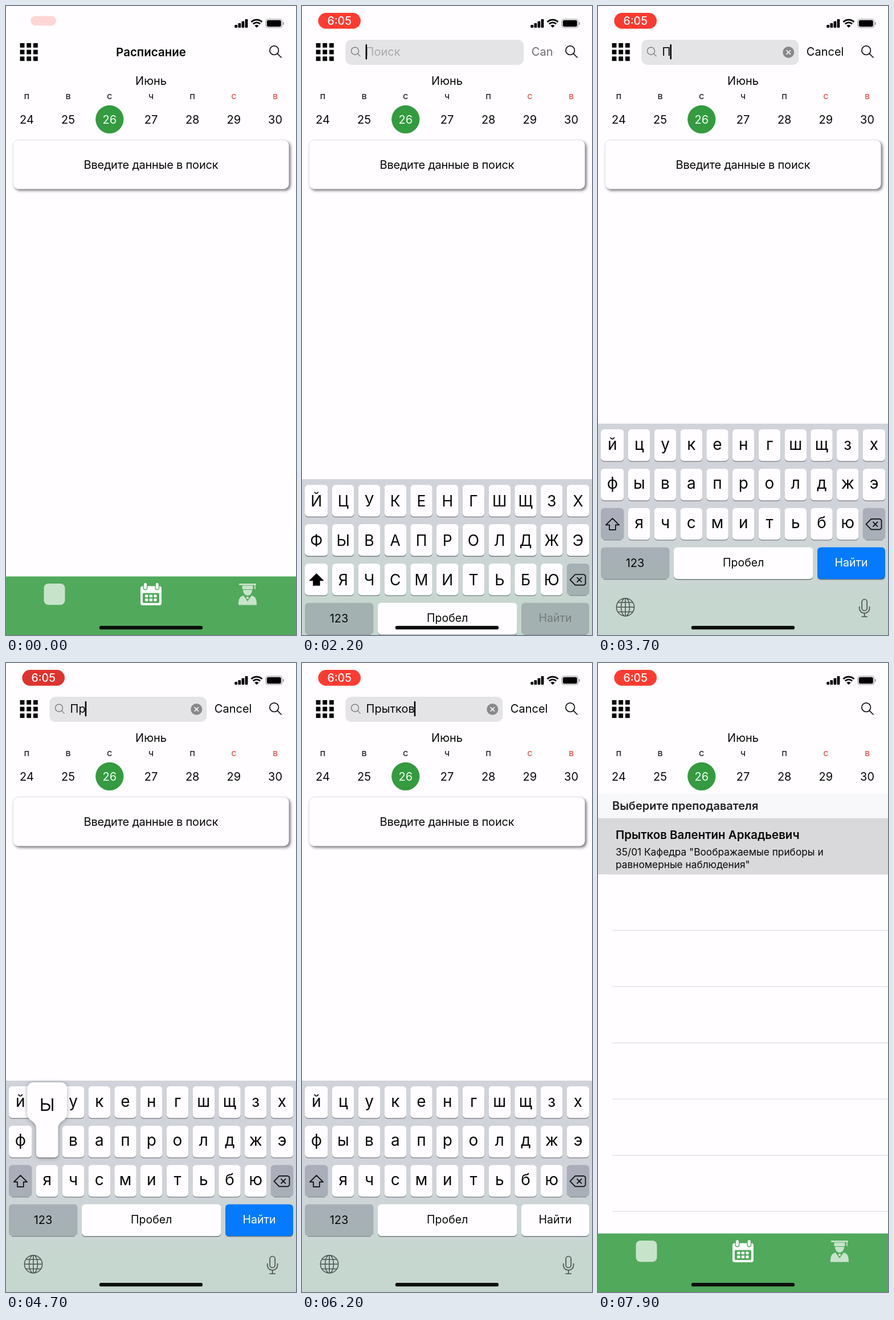
Animation, 509 px wide and 1101 px high, one loop 8000 ms. Source, as an HTML page with a canvas:

```html
<!DOCTYPE html>
<html lang="ru">
<head>
<meta charset="utf-8">
<style>
html, body { margin: 0; width: 100%; height: 100%; overflow: hidden; background: #fffdff; }
canvas { display: block; width: 509px; height: 1101px; }
</style>
</head>
<body>
<canvas id="stage"></canvas>
<script>
const W = 509, H = 1101, LOOP = 8000;
const canvas = document.getElementById('stage');
const c = canvas.getContext('2d');
const dpr = window.devicePixelRatio || 1;
canvas.width = W * dpr;
canvas.height = H * dpr;

const BG = '#fffdff', GREEN = '#51a95c', PALE = '#c7e4ca', BAR = '#e4e3e6';
const ROWS = ['йцукенгшщзх', 'фывапролджэ', ' ячсмитьбю '];
const KB_TOP = 731, KB_H = 370;

// letter, press time, release time
const TYPING = [
  ['П', 3450, 3560], ['р', 4180, 4290], ['ы', 4640, 4740], ['т', 4930, 5030],
  ['к', 5200, 5300], ['о', 5480, 5580], ['в', 5690, 5790]
];
const FIND_DOWN = 6080, DISMISS = 6330, RESULTS = 6780, SELECT = 7500;

const clamp = v => Math.max(0, Math.min(1, v));
const span = (t, start, dur) => clamp((t - start) / dur);
const smooth = p => p * p * (3 - 2 * p);
const easeOut = p => 1 - (1 - p) ** 3;
const mix = (a, b, p) => a + (b - a) * p;

function box(x, y, w, h, r, fill) {
  c.beginPath();
  c.roundRect(x, y, w, h, r);
  c.fillStyle = fill;
  c.fill();
}

function disc(x, y, r, fill) {
  c.beginPath();
  c.arc(x, y, r, 0, 7);
  c.fillStyle = fill;
  c.fill();
}

function stroke(color, width, draw) {
  c.beginPath();
  draw();
  c.strokeStyle = color;
  c.lineWidth = width;
  c.stroke();
}

function poly(points) {
  points.forEach(([x, y], i) => i ? c.lineTo(x, y) : c.moveTo(x, y));
}

function text(str, x, y, size, o = {}) {
  c.font = `${o.weight || 400} ${size}px Inter, Roboto, sans-serif`;
  c.textAlign = o.align || 'center';
  c.fillStyle = o.color || '#080808';
  c.fillText(str, x, y);
}

function lens(x, y, r, len, color, width) {
  const k = r * 0.72;
  stroke(color, width, () => {
    c.arc(x, y, r, 0, 7);
    c.moveTo(x + k, y + k);
    c.lineTo(x + k + len, y + k + len);
  });
}

function status(t) {
  const grow = easeOut(span(t, -60, 420));
  const s = mix(0.36, 1, grow);
  const dark = clamp(0.5 - 0.68 * Math.cos(t / 2000 * Math.PI * 2));
  const red = [mix(255, 219, dark), mix(59, 50, dark), mix(48, 45, dark)].map(Math.round);
  c.save();
  c.translate(65.7, 25.9);
  c.scale(s, s);
  c.globalAlpha = mix(0.2, 1, span(t, 0, 260));
  box(-37.3, -13.8, 74.6, 27.6, 13.8, `rgb(${red})`);
  c.globalAlpha = span(t, 60, 240);
  text('6:05', 0, 7.2, 19.5, { weight: 500, color: '#fff' });
  c.restore();

  [5, 8, 11.5, 15].forEach((h, i) => box(401.3 + i * 6.1, 38 - h, 4.8, h, 1.2, '#000'));
  for (const r of [13.4, 8.6]) {
    stroke('#000', 2.8, () => c.arc(440, 37.5, r, Math.PI * 1.25, Math.PI * 1.75));
  }
  c.beginPath();
  c.moveTo(440, 38);
  c.arc(440, 38, 5, Math.PI * 1.25, Math.PI * 1.75);
  c.fillStyle = '#000';
  c.fill();
  stroke('#99989b', 1.2, () => c.roundRect(456, 23, 28.6, 15, 4));
  box(457.8, 24.8, 25, 11.4, 2.6, '#000');
  box(486, 28, 1.8, 5, 1, '#99989b');
}

function navAndWeek() {
  for (let i = 0; i < 9; i++) {
    c.fillStyle = '#000';
    c.fillRect(24.6 + i % 3 * 11.7, 65 + Math.floor(i / 3) * 11.7, 7.8, 7.8);
  }
  lens(470.7, 77.7, 7.8, 7.2, '#111', 1.7);
  text('Июнь', 254.5, 137.5, 20);
  disc(181.8, 198.4, 24.6, '#349b40');
  [...'пвсчпсв'].forEach((day, i) => {
    const x = 36.4 + i * 72.7;
    text(day, x, 163.3, 16.5, { color: i > 4 ? '#df4a43' : '#111' });
    text(24 + i, x, 205.5, 20, { color: i === 2 ? '#f4fff4' : '#080808' });
  });
}

function card() {
  c.save();
  c.shadowColor = 'rgba(0,0,0,.55)';
  c.shadowBlur = 5 * dpr;
  c.shadowOffsetX = c.shadowOffsetY = 2.6 * dpr;
  box(12.5, 234.8, 484.2, 85.7, 9, BG);
  c.restore();
  stroke('rgba(0,0,0,.08)', 1, () => c.roundRect(12.5, 234.8, 484.2, 85.7, 9));
  c.letterSpacing = '-0.2px';
  text('Введите данные в поиск', 254.5, 285.3, 20);
  c.letterSpacing = '0px';
}

function results(t) {
  c.fillStyle = '#f8f7fa';
  c.fillRect(0, 228.5, W, 43);
  text('Выберите преподавателя', 25, 257.3, 20, { weight: 600, align: 'left', color: '#222' });
  c.fillStyle = '#dfdee2';
  for (let i = 0; i < 7; i++) c.fillRect(25, 369 + i * 98.4, W - 25, 1.3);
  if (t >= SELECT) {
    c.fillStyle = '#d9d8da';
    c.fillRect(0, 271.5, W, 98.5);
  }
  text('Прытков Валентин Аркадьевич', 31, 307.8, 20.5, { weight: 600, align: 'left' });
  text('35/01 Кафедра "Воображаемые приборы и', 31, 337.3, 17.3, { align: 'left' });
  text('равномерные наблюдения"', 31, 359, 17.3, { align: 'left' });
}

function tabs() {
  c.fillStyle = GREEN;
  c.fillRect(0, 998.5, W, H - 998.5);
  box(66.5, 1011, 37, 37.3, 8, PALE);

  box(236, 1015.5, 37, 33.5, 4, '#fff');
  for (const x of [240.6, 261.4]) {
    box(x, 1009, 7.8, 13.5, 3.9, GREEN);
    box(x + 1.4, 1010, 5, 11, 2.5, '#fff');
  }
  box(240, 1027.5, 29, 17.5, 2, GREEN);
  for (let i = 0; i < 6; i++) {
    box(244.2 + i % 3 * 7.6, 1030.5 + Math.floor(i / 3) * 6.8, 5.2, 4.6, 0.8, '#fff');
  }

  box(409, 1011, 30, 2.8, 1, PALE);
  box(436, 1012, 1.8, 9, 0.9, PALE);
  box(414.5, 1014.5, 19, 6.5, 1.5, PALE);
  c.beginPath();
  c.moveTo(416, 1022);
  c.lineTo(432, 1022);
  c.bezierCurveTo(432, 1028, 428, 1032, 424, 1032);
  c.bezierCurveTo(420, 1032, 416, 1028, 416, 1022);
  c.fill();
  c.beginPath();
  c.moveTo(408, 1048.5);
  c.bezierCurveTo(408, 1038, 410, 1033.5, 417, 1032);
  c.lineTo(424, 1042);
  c.lineTo(431, 1032);
  c.bezierCurveTo(438, 1033.5, 440, 1038, 440, 1048.5);
  c.fill();
  box(422, 1034, 4, 4, 1, PALE);
}

function searchBar(t, typed) {
  const open = smooth(span(t, 1033, 250));
  if (t < 1033 || t >= DISMISS + 200) return;
  const cancel = smooth(span(t, 2050, 270));
  const w = 366 * open, h = 44 * open;
  const left = 259.3 - w / 2;
  const right = left + w - 90 * cancel;
  c.save();
  c.globalAlpha = 1 - span(t, DISMISS, 200);
  const base = c.globalAlpha;
  box(left, 81 - h / 2, right - left, h, 10 * Math.max(open, 0.4), BAR);

  c.save();
  c.beginPath();
  c.rect(left, 81 - h / 2 - 1, right - left, h + 3);
  c.clip();
  lens(left + mix(7, 16.7, open), mix(86.5, 78.7, open), 6.5, 4.8, '#808083', 1.4);
  const x = left + mix(13, 36.3, open);
  if (typed) {
    text(typed, x, 87.3, 20, { align: 'left' });
  } else {
    c.globalAlpha = base * mix(0.4, 1, open);
    text('Поиск', x - 1, 87.3, 20, { align: 'left', color: '#a9a8ac' });
    c.globalAlpha = base;
  }
  const busy = t >= TYPING[0][1];
  const lit = busy || (t - 700) % 1000 < 550;
  if (t >= 2050 && t < DISMISS && lit) {
    c.font = '400 20px Inter, Roboto, sans-serif';
    const end = typed ? c.measureText(typed).width : 0;
    box(x - 1 + end, 67, 2.5, 26.5, 1, '#000');
  }
  if (typed) {
    disc(334.3, 81, 10, '#88878b');
    stroke('#f4f3f5', 1.7, () => {
      poly([[330.6, 77.3], [338, 84.7]]);
      poly([[338, 77.3], [330.6, 84.7]]);
    });
  }
  c.restore();

  if (cancel > 0) {
    c.beginPath();
    c.rect(right, 59, 442 - right, 44);
    c.clip();
    c.globalAlpha = base * cancel;
    text('Cancel', right + 13.5, 87.3, 20, { align: 'left' });
  }
  c.restore();
}

function keyRect(col, row) {
  const x = col === 0 ? 5 : 53 + 45.75 * (col - 1);
  const w = col === 0 ? 40.5 : col === 10 ? 39.5 : 38.5;
  return { x, w, y: KB_TOP + 10 + row * 68.9, mid: x + w / 2 };
}

function key(x, y, w, fill) {
  box(x, y + 1.3, w, 55.5, 6, 'rgba(60,62,68,.6)');
  box(x, y, w, 55.5, 6, fill);
}

// Translucent key: only a thin shade shows below it
function dimKey(x, y, w) {
  box(x, y, w, 55.5, 6, 'rgba(57,64,90,.25)');
  stroke('rgba(60,62,68,.5)', 1.2, () => poly([[x + 5, y + 56], [x + w - 5, y + 56]]));
}

function shiftKey(upper) {
  const { x, y, w } = keyRect(0, 2);
  if (upper) key(x, y, w, BG); else dimKey(x, y, w);
  const top = y + 18;
  c.lineJoin = 'round';
  stroke('#0a0a0a', 1.7, () => {
    poly([[25.4, top], [37, top + 11.5], [30.8, top + 11.5], [30.8, top + 20],
      [20, top + 20], [20, top + 11.5], [13.8, top + 11.5]]);
    c.closePath();
  });
  if (upper) {
    c.fillStyle = '#000';
    c.fill();
  }
}

function eraseKey() {
  const { x, y, w } = keyRect(10, 2);
  dimKey(x, y, w);
  const m = y + 28.3;
  stroke('#0a0a0a', 1.7, () => {
    poly([[470.5, m], [479.5, m - 9.3], [495, m - 9.3], [497.5, m - 7], [497.5, m + 7],
      [495, m + 9.3], [479.5, m + 9.3]]);
    c.closePath();
    poly([[482.5, m - 4.2], [491, m + 4.2]]);
    poly([[491, m - 4.2], [482.5, m + 4.2]]);
  });
}

function globe() {
  stroke('#4a5352', 1.5, () => {
    c.arc(48, 1052.3, 15.6, 0, 7);
    c.moveTo(55.5, 1052.3);
    c.ellipse(48, 1052.3, 7.5, 15.6, 0, 0, 7);
    poly([[48, 1036.7], [48, 1067.9]]);
    poly([[32.4, 1052.3], [63.6, 1052.3]]);
    poly([[35, 1044], [61, 1044]]);
    poly([[35, 1060.6], [61, 1060.6]]);
  });
}

function mic() {
  stroke('#4a5352', 1.7, () => {
    c.roundRect(463.2, 1038.5, 9, 20, 4.5);
    c.moveTo(458.8, 1051);
    c.lineTo(458.8, 1054);
    c.arc(467.7, 1054, 8.9, Math.PI, 0, true);
    c.lineTo(476.6, 1051);
    poly([[467.7, 1063], [467.7, 1069]]);
    poly([[462.5, 1069], [473, 1069]]);
  });
}

function popup(letter) {
  const low = letter.toLowerCase();
  const row = ROWS.findIndex(r => r.includes(low));
  const { mid, y, x, w } = keyRect(ROWS[row].indexOf(low), row);
  const top = y - 76, bottom = y + 55.5;
  c.save();
  c.shadowColor = 'rgba(0,0,0,.35)';
  c.shadowBlur = 7 * dpr;
  c.shadowOffsetY = dpr;
  c.beginPath();
  c.moveTo(mid - 25, top);
  c.arcTo(mid + 35, top, mid + 35, top + 12, 11);
  c.lineTo(mid + 35, y - 22);
  c.bezierCurveTo(mid + 35, y - 7, x + w, y - 10, x + w, y + 5);
  c.arcTo(x + w, bottom, x, bottom, 6);
  c.arcTo(x, bottom, x, y, 6);
  c.lineTo(x, y + 5);
  c.bezierCurveTo(x, y - 10, mid - 35, y - 7, mid - 35, y - 22);
  c.arcTo(mid - 35, top, mid, top, 11);
  c.closePath();
  c.fillStyle = BG;
  c.fill();
  c.restore();
  text(letter, mid, y - 26, 40, { weight: 300 });
}

function keyboard(t, typed) {
  const shown = easeOut(span(t, 2050, 420)) - easeOut(span(t, DISMISS, 380));
  if (shown <= 0) return;
  const drop = KB_H * (1 - shown);
  const back = c.createLinearGradient(0, 890, 0, 1050);
  back.addColorStop(0, '#d1d3da');
  back.addColorStop(1, '#c6d7cf');
  c.fillStyle = back;
  c.fillRect(0, KB_TOP + drop, W, KB_H);

  c.save();
  c.translate(0, drop);
  const upper = !typed;
  ROWS.forEach((row, r) => [...row].forEach((ch, i) => {
    if (ch === ' ') return;
    const k = keyRect(i, r);
    key(k.x, k.y, k.w, BG);
    if (upper) text(ch.toUpperCase(), k.mid, k.y + 38, 26.5);
    else text(ch, k.mid, k.y + 35.5, 28);
  }));
  shiftKey(upper);
  eraseKey();

  const y = 947.6;
  dimKey(5, y, 120.5);
  text('123', 65, y + 34.5, 20);
  key(133, y, 244.5, BG);
  text('Пробел', 255.2, y + 33.3, 19.5);
  let label = '#72797c';
  if (!typed) {
    dimKey(385, y, 119);
  } else {
    const pressed = t >= FIND_DOWN;
    key(385, y, 119, pressed ? BG : '#057aff');
    label = pressed ? '#080808' : '#fff';
  }
  text('Найти', 444.5, y + 33.3, 19.5, { color: label });
  globe();
  mic();

  const held = TYPING.find(([, down, up]) => t >= down && t < up);
  if (held) popup(held[0]);
  c.restore();
}

function draw(t) {
  c.setTransform(dpr, 0, 0, dpr, 0, 0);
  c.fillStyle = BG;
  c.fillRect(0, 0, W, H);
  const typed = TYPING.filter(k => t >= k[2]).map(k => k[0]).join('');
  status(t);
  navAndWeek();
  if (t < 1000) text('Расписание', 254.5, 88.4, 20.5, { weight: 600 });
  searchBar(t, typed);
  if (t < RESULTS) card(); else results(t);
  tabs();
  keyboard(t, typed);
  box(163.8, 1085, 181.4, 6.3, 3.1, '#0c0f0d');
}

const begin = performance.now();
function tick() {
  draw((performance.now() - begin) % LOOP);
  requestAnimationFrame(tick);
}
tick();
</script>
</body>
</html>
```
